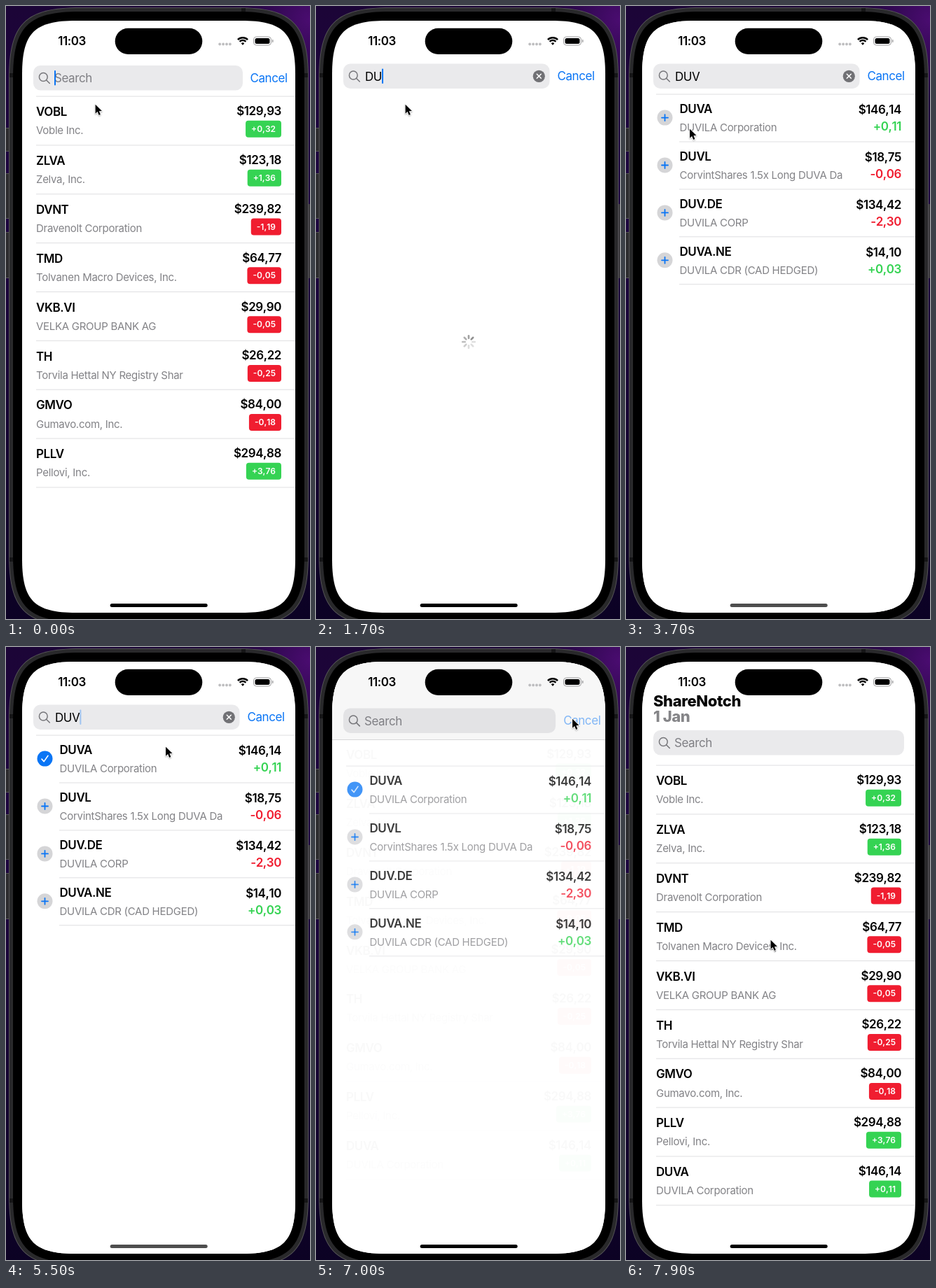
An HTML page with a canvas that plays this animation: 434 by 876 pixels, repeating every 8 s.

```html
<!DOCTYPE html>
<html lang="en">
<head>
<meta charset="utf-8">
<title>Stock list search</title>
<style>
  html, body { margin: 0; width: 100%; height: 100%; overflow: hidden; background: #12032a; }
  canvas { display: block; width: 434px; height: 876px; }
</style>
</head>
<body>
<canvas id="stage"></canvas>
<script>
const W = 434, H = 876, LOOP = 8000, STEP = 100;
const BLUE = '#0a75f5', GREEN = '#35d353', RED = '#f01d30', GRAY = '#828286', LINE = '#dfdfe1';
const canvas = document.getElementById('stage');
const c = canvas.getContext('2d');
const ratio = window.devicePixelRatio || 1;
canvas.width = W * ratio;
canvas.height = H * ratio;

const watched = [
  ['VOBL', 'Voble Inc.', '$129,93', '+0,32'],
  ['ZLVA', 'Zelva, Inc.', '$123,18', '+1,36'],
  ['DVNT', 'Dravenolt Corporation', '$239,82', '-1,19'],
  ['TMD', 'Tolvanen Macro Devices, Inc.', '$64,77', '-0,05'],
  ['VKB.VI', 'VELKA GROUP BANK AG', '$29,90', '-0,05'],
  ['TH', 'Torvila Hettal NY Registry Shar', '$26,22', '-0,25'],
  ['GMVO', 'Gumavo.com, Inc.', '$84,00', '-0,18'],
  ['PLLV', 'Pellovi, Inc.', '$294,88', '+3,76']
];
const found = [
  ['DUVA', 'DUVILA Corporation', '$146,14', '+0,11'],
  ['DUVL', 'CorvintShares 1.5x Long DUVA Da', '$18,75', '-0,06'],
  ['DUV.DE', 'DUVILA CORP', '$134,42', '-2,30'],
  ['DUVA.NE', 'DUVILA CDR (CAD HEDGED)', '$14,10', '+0,03']
];

// Pointer path: time, x, y
const path = [
  [0, 127, 140], [2850, 127, 140], [3700, 90.5, 175], [4300, 57, 175], [4700, 50, 163],
  [5250, 50, 162], [5500, 227.5, 142], [5700, 296, 118], [6000, 323, 107], [6150, 323, 107],
  [6600, 365.5, 102], [7200, 365.5, 102], [7600, 269, 210], [7900, 206, 418], [8000, 206, 418]
];

const clamp = v => Math.max(0, Math.min(1, v));
const ramp = (t, a, b) => clamp((t - a) / (b - a));
const smooth = x => x * x * (3 - 2 * x);
const tint = change => change[0] === '+' ? GREEN : RED;

function font(size, weight, spacing, kerning = 'normal') {
  c.font = `${weight} ${size}px Inter, "Open Sans", sans-serif`;
  c.letterSpacing = `${spacing}px`;
  c.fontKerning = kerning;
}
const headline = () => font(17, 600, -0.43);
const figures = () => font(17, 600, -0.43, 'none');
const body = () => font(17, 400, -0.43);
const caption = () => font(15, 400, -0.28);

// y is the middle of the capitals
function text(s, x, y, size, color, align = 'left') {
  c.fillStyle = color;
  c.textAlign = align;
  c.fillText(s, x, y + size * 0.36);
}
function box(x, y, w, h, r, color) {
  c.fillStyle = color;
  c.beginPath();
  c.roundRect(x, y, w, h, r);
  c.fill();
}
// Rectangle whose corners ease into the straight sides
function softBox(x, y, w, h, r, color) {
  const e = r * 1.4, k = r * 0.315, x2 = x + w, y2 = y + h;
  c.fillStyle = color;
  c.beginPath();
  c.moveTo(x + e, y);
  c.lineTo(x2 - e, y);
  c.bezierCurveTo(x2 - k, y, x2, y + k, x2, y + e);
  c.lineTo(x2, y2 - e);
  c.bezierCurveTo(x2, y2 - k, x2 - k, y2, x2 - e, y2);
  c.lineTo(x + e, y2);
  c.bezierCurveTo(x + k, y2, x, y2 - k, x, y2 - e);
  c.lineTo(x, y + e);
  c.bezierCurveTo(x, y + k, x + k, y, x + e, y);
  c.fill();
}
function disc(x, y, r, color) {
  c.fillStyle = color;
  c.beginPath();
  c.arc(x, y, r, 0, Math.PI * 2);
  c.fill();
}
function stroke(points, width, color) {
  c.strokeStyle = color;
  c.lineWidth = width;
  c.lineCap = c.lineJoin = 'round';
  c.beginPath();
  points.forEach(([x, y]) => c.lineTo(x, y));
  c.stroke();
}
function rule(x, y) {
  c.fillStyle = LINE;
  c.fillRect(x, y - 0.4, 413 - x, 1);
}
function faded(alpha, draw) {
  if (alpha <= 0) return;
  c.save();
  c.globalAlpha *= alpha;
  draw();
  c.restore();
}

function drawPhone() {
  const bg = c.createLinearGradient(0, 0, 0, H);
  bg.addColorStop(0, '#1c0537');
  bg.addColorStop(0.3, '#1d0440');
  bg.addColorStop(0.6, '#180336');
  bg.addColorStop(1, '#0c0224');
  c.fillStyle = bg;
  c.fillRect(0, 0, W, H);
  const glow = c.createRadialGradient(W, 20, 0, W, 20, 110);
  glow.addColorStop(0, '#4a0c70');
  glow.addColorStop(1, '#4a0c7000');
  c.fillStyle = glow;
  c.fillRect(W - 110, 0, 110, 130);

  for (const [y, h] of [[174, 34], [239, 65], [323, 66]]) {
    box(-3, y, 9, h, 1, '#555');
    box(-3, y + 1, 9, h - 2, 1, '#2c2b2e');
  }
  box(430, 283, 8, 106, 1, '#39373b');

  softBox(4, 2, 428, 884, 73, '#555457');
  softBox(5, 3, 426, 882, 72, '#29292b');
  c.fillStyle = '#161617';
  for (const y of [96, 788]) {
    c.fillRect(5, y, 5, 6);
    c.fillRect(426, y, 5, 6);
  }
  c.fillRect(336, 3, 6, 5);
  softBox(10, 8, 416, 872, 68, '#000');
}

function drawStatus(indicator) {
  figures();
  text('11:03', 94, 50, 17, '#000', 'center');
  box(155.7, 31.8, 124.6, 37.2, 18.6, '#000');
  for (let i = 0; i < 4; i++) disc(305.2 + i * 4.9, 54.5, 1.9, '#bdbdbf');

  c.strokeStyle = '#000';
  c.lineCap = 'butt';
  c.lineWidth = 2.5;
  for (const r of [10, 6.2]) {
    c.beginPath();
    c.arc(338, 55.3, r, -Math.PI * 0.75, -Math.PI * 0.25);
    c.stroke();
  }
  c.fillStyle = '#000';
  c.beginPath();
  c.moveTo(338, 56);
  c.arc(338, 55.6, 3.2, -Math.PI * 0.75, -Math.PI * 0.25);
  c.fill();

  c.strokeStyle = '#9c9c9e';
  c.lineWidth = 1;
  c.beginPath();
  c.roundRect(353.5, 44, 25, 12, 4);
  c.stroke();
  box(355.5, 46, 21, 8, 2.5, '#000');
  box(380, 48, 1.5, 4, 1, '#9c9c9e');
  box(148.7, 854, 139, 5, 2.5, indicator);
}

function drawWatched(top, rows) {
  rule(43, top);
  rows.forEach(([ticker, name, price, change], i) => {
    const y = top + i * 69.85;
    headline();
    text(ticker, 43, y + 22.2, 17, '#000');
    figures();
    text(price, 393, y + 21, 17, '#000', 'right');
    caption();
    text(name, 43, y + 49, 15, GRAY);
    font(12, 600, 0, 'none');
    const w = c.measureText(change).width + 16;
    box(393 - w, y + 34.8, w, 24, 4, tint(change));
    text(change, 393 - w / 2, y + 46.6, 12, '#fff', 'center');
    rule(43, y + 69.85);
  });
}

function drawFound(top, added) {
  rule(43, top);
  found.forEach(([ticker, name, price, change], i) => {
    const y = top + i * 67.9, cy = y + 33.6;
    if (i === 0 && added > 0) {
      disc(55.5, cy, 11 * (0.85 + 0.15 * added), BLUE);
      stroke([[51, cy + 0.5], [54.2, cy + 4], [60, cy - 4.3]], 1.6, '#fff');
    } else {
      disc(55.5, cy, 11, '#d5d5d7');
      stroke([[51, cy], [60, cy]], 1.8, BLUE);
      stroke([[55.5, cy - 4.5], [55.5, cy + 4.5]], 1.8, BLUE);
    }
    headline();
    text(ticker, 76.5, y + 21, 17, '#000');
    figures();
    text(price, 393, y + 22, 17, '#000', 'right');
    text(change, 393, y + 46, 17, tint(change), 'right');
    caption();
    text(name, 76.5, y + 47.8, 15, GRAY);
    rule(76, y + 67.9);
  });
}

function drawSpinner(t) {
  const head = Math.floor((t - 1700) / 125) + 1;
  for (let i = 0; i < 8; i++) {
    const a = i * Math.PI / 4 - Math.PI / 2;
    const age = (((head - i) % 8) + 8) % 8;
    const shade = Math.min(222, 145 + age * 15);
    const at = r => [218 + Math.cos(a) * r, 480 + Math.sin(a) * r];
    stroke([at(5.2), at(8.8)], 2.6, `rgb(${shade},${shade},${shade})`);
  }
}

function drawSearch(y, right, cancelX, cancelAlpha, query, caret) {
  const cy = y + 17.8;
  box(39, y, right - 39, 35.5, 10, 'rgba(118,118,128,.15)');
  c.strokeStyle = '#77777b';
  c.lineWidth = 1.5;
  c.beginPath();
  c.arc(53.3, cy - 1.3, 5.9, 0, Math.PI * 2);
  c.stroke();
  stroke([[57.7, cy + 3.2], [62.3, cy + 7.7]], 1.6, '#77777b');

  body();
  const textX = query ? 70 : 69;
  text(query || 'Search', textX, cy + 0.4, 17, query ? '#000' : '#7f7f84');
  const caretX = query ? textX + c.measureText(query).width : 69;
  faded(caret, () => box(caretX, y + 7, 2, 21.5, 1, BLUE));
  if (query) {
    const x = right - 15.2;
    disc(x, cy, 8.6, '#717175');
    stroke([[x - 3, cy - 3], [x + 3, cy + 3]], 1.5, '#fff');
    stroke([[x + 3, cy - 3], [x - 3, cy + 3]], 1.5, '#fff');
  }
  body();
  faded(cancelAlpha, () => text('Cancel', cancelX, cy - 0.3, 17, BLUE));
}

function drawPointer(t) {
  const i = path.findIndex(k => k[0] > t);
  const [a, b] = [path[i - 1], path[i]];
  const k = ramp(t, a[0], b[0]);
  c.save();
  c.translate(a[1] + (b[1] - a[1]) * k + 0.6, a[2] + (b[2] - a[2]) * k + 0.8);
  c.scale(0.91, 0.91);
  c.beginPath();
  for (const [x, y] of [[0, 0], [0, 14.2], [3.3, 11.2], [5.6, 16.6], [8, 15.6], [5.8, 10.4], [10.3, 10.2]]) c.lineTo(x, y);
  c.closePath();
  c.shadowColor = 'rgba(0,0,0,.3)';
  c.shadowBlur = 2 * ratio;
  c.shadowOffsetY = ratio;
  c.lineJoin = 'round';
  c.lineWidth = 1.8;
  c.strokeStyle = '#fff';
  c.stroke();
  c.shadowColor = 'transparent';
  c.fillStyle = '#000';
  c.fill();
  c.restore();
}

function caretAlpha(t) {
  if (t >= 6800) return 0;
  if (t >= 1000 && t < 2400) return 1;
  const p = (t < 1000 ? t : t - 50) % 1000;
  return 1 - ramp(p, 350, 500) + ramp(p, 650, 900);
}

function typed(t) {
  if (t < 1200 || t >= 6800) return '';
  return 'DUV'.slice(0, t < 1400 ? 1 : t < 1900 ? 2 : 3);
}

function draw(t) {
  const settle = t < 100 ? 1 : t < 200 ? 0.3 : 0;
  const leave = ramp(t, 6850, 7500);
  const p = smooth(leave);
  const barY = 82.5 + 2.5 * settle + 36.5 * p;

  c.setTransform(ratio, 0, 0, ratio, 0, 0);
  drawPhone();
  c.save();
  softBox(23, 21, 390, 846, 55, '#fff');
  c.clip();

  if (t < 1200) drawWatched(126 + 3 * settle, watched);
  if (leave > 0) drawWatched(126 + 43 * p, [...watched, found[0]]);
  if (t >= 1500 && t < 2000) faded(ramp(t, 1300, 1600), () => drawSpinner(t));
  if (t >= 2200 && leave < 1) {
    faded(1 - leave ** 2.6, () => {
      c.fillStyle = '#fff';
      c.fillRect(23, 21, 390, 846);
    });
    faded(1 - leave, () => drawFound(leave > 0 ? 170 : 126, ramp(t, 4600, 4900)));
  }

  if (leave > 0) {
    const shade = Math.round(255 - 9 * (1 - p));
    c.fillStyle = `rgb(${shade},${shade},${shade})`;
    c.fillRect(23, 21, 390, barY + 24);
    faded(1 - p, () => {
      c.fillStyle = '#d2d2d4';
      c.fillRect(23, Math.round(barY + 45), 390, 1);
    });
    faded(ramp(p, 0.3, 1), () => {
      const shift = 36.5 * (p - 1);
      font(22, 800, -0.4);
      text('ShareNotch', 39, 77.5 + shift, 22, '#000');
      text('1 Jan', 39, 99.5 + shift, 22, '#858588');
    });
  }
  const cancelAlpha = t < 6800 ? 1 : t < 6900 ? 0.6 : 1 - leave * 2.2;
  drawSearch(barY, 333.5 + 4.5 * settle + 63.5 * p, 344.5 + 4 * settle + 64 * p,
    cancelAlpha, typed(t), caretAlpha(t));

  const gray = t < 6800 ? Math.round(78 * ramp(t, 2100, 2400)) : 0;
  drawStatus(`rgb(${gray},${gray},${gray})`);
  c.restore();
  drawPointer(t);
}

const start = performance.now();
function tick() {
  const t = (performance.now() - start) % LOOP;
  draw(Math.floor(t / STEP) * STEP);
  requestAnimationFrame(tick);
}
tick();
</script>
</body>
</html>
```
